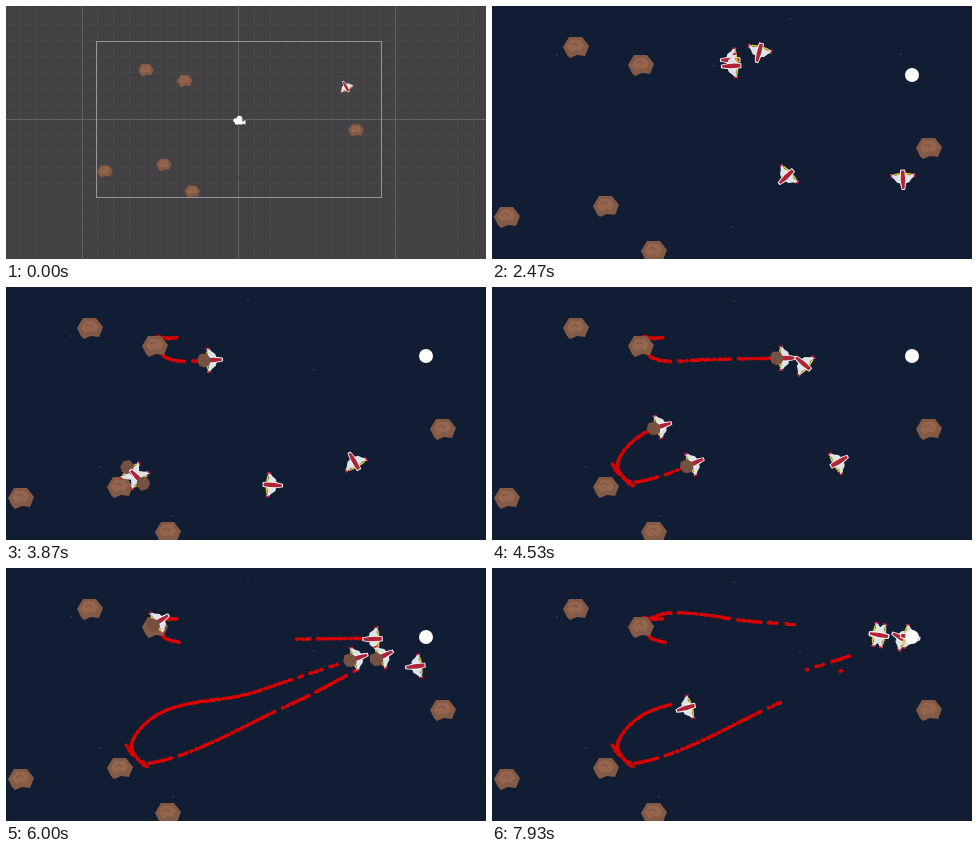
These frames come from a looping animation (480 by 253 pixels, 8000 ms). An HTML page with a canvas:

```html
<!DOCTYPE html>
<html lang="en">
<head>
<meta charset="utf-8">
<title>Asteroid foragers</title>
<style>
html, body { margin: 0; width: 100%; height: 100%; overflow: hidden; background: #111d33; }
canvas { display: block; width: 100vw; height: 100vh; }
</style>
</head>
<body>
<canvas id="stage"></canvas>
<script>
// Times are in seconds, angles in degrees.
const W = 480, H = 253, LOOP = 8, FPS = 15;
const PLAY = 0.4, LAUNCH = 1.2, SPEED = 130, ERASE_RADIUS = 14;
const BASE = { x: 420, y: 69 }, START_ANGLE = -119;
const canvas = document.getElementById('stage');
const ctx = canvas.getContext('2d');

const asteroids = [[84, 41], [149, 59], [437, 142], [114, 200], [15, 211], [162, 245]];
const earlyStars = [[65, 49], [298, 13], [409, 48], [222, 60], [240, 221]];
const lateStars = [[65, 49], [242, 14], [94, 180], [167, 229], [308, 83]];

function random(seed) {
  return () => {
    seed = (seed * 16807) % 2147483647;
    return seed / 2147483647;
  };
}

// Each pose is [time, x, y, angle]; curves between poses follow from the cruising speed.
// haul: pickup, end of trail, delivery. erase: when the ship clears trails it passes.
function makeShip({ poses, haul, erase }) {
  return { poses: [[LAUNCH, BASE.x, BASE.y, START_ANGLE], ...poses], haul, erase };
}

const ships = [
  makeShip({
    haul: [3.0, 5.12, 5.45], erase: [5.5, 6.35],
    poses: [
      [2.47, 238, 54, 180], [3.02, 167, 51, 175], [3.4, 152, 60, 75], [3.87, 207, 73, -2],
      [5.2, 380, 70, -1], [5.45, 412, 69, 0], [6.35, 302, 72, 180], [6.87, 284, 77, 222],
      [7.93, 387, 67, 8]
    ]
  }),
  makeShip({
    haul: [3.78, 5.78, 6.3], erase: [6.85, 8],
    poses: [
      [2.47, 239, 60, 178], [3.87, 127, 187, 48], [4.12, 150, 194, -12], [5.2, 285, 136, -24],
      [6.3, 414, 72, -20], [6.87, 333, 115, 176], [7.93, 194, 140, 163]
    ]
  }),
  makeShip({
    haul: [3.78, 6.05, 6.5],
    poses: [
      [2.47, 294, 171, 137], [3.87, 131, 190, 228], [4.19, 135, 160, -48], [5.2, 252, 123, -19],
      [6.5, 415, 70, -17], [6.87, 411, 64, 195], [7.4, 385, 92, 0], [7.93, 387, 67, 188]
    ]
  }),
  makeShip({
    poses: [
      [2.47, 267, 47, 102], [3.87, 267, 198, 2], [5.2, 415, 119, -45], [6.87, 391, 71, -57],
      [7.93, 409, 70, 210]
    ]
  }),
  makeShip({
    haul: [5.98, 7.14, 7.9], erase: [4.65, 5.6],
    poses: [
      [2.47, 411, 174, 88], [3.87, 348, 174, -119], [4.65, 298, 72, 180], [5.2, 229, 72, 181],
      [5.8, 155, 60, 180], [6.19, 178, 45, -3], [6.87, 266, 54, 4], [7.93, 418, 69, 10]
    ]
  })
];

const radians = degrees => degrees * Math.PI / 180;

function position(ship, t) {
  const p = ship.poses, last = p.length - 1;
  if (t <= p[0][0]) return { x: p[0][1], y: p[0][2] };
  t = Math.min(t, p[last][0]);
  const i = p.findIndex(pose => pose[0] >= t);
  const [t0, x0, y0, a0] = p[i - 1], [t1, x1, y1, a1] = p[i];
  const span = t1 - t0, u = (t - t0) / span, reach = SPEED * span;
  const mix = u * u * (3 - 2 * u);
  const leave = reach * u * (1 - u) ** 2, arrive = reach * u * u * (u - 1);
  return {
    x: x0 + (x1 - x0) * mix + Math.cos(radians(a0)) * leave + Math.cos(radians(a1)) * arrive,
    y: y0 + (y1 - y0) * mix + Math.sin(radians(a0)) * leave + Math.sin(radians(a1)) * arrive
  };
}

function heading(ship, t) {
  if (t <= LAUNCH) return radians(START_ANGLE);
  const end = Math.min(t, ship.poses.at(-1)[0]);
  const a = position(ship, end - 0.02), b = position(ship, end);
  return Math.atan2(b.y - a.y, b.x - a.x);
}

function eraseTime(dash) {
  for (const ship of ships.filter(s => s.erase)) {
    for (let t = ship.erase[0]; t < ship.erase[1]; t += 0.03) {
      const { x, y } = position(ship, t);
      if (t > dash.born && Math.hypot(x - dash.x, y - dash.y) < ERASE_RADIUS) return t;
    }
  }
  return Infinity;
}

function makeTrail(ship, index) {
  const rnd = random(index * 97 + 11), trail = [];
  const [start, end] = ship.haul;
  for (let t = start; t < end; t += 0.041) {
    const dash = { ...position(ship, t), angle: heading(ship, t) + (rnd() - 0.5) * 0.4, born: t + 0.08 };
    dash.length = 1 + rnd() * 3;
    dash.gone = eraseTime(dash);
    if (rnd() > 0.1) trail.push(dash);
  }
  return trail;
}

const dashes = ships.filter(s => s.haul).flatMap(makeTrail);

function polygon(color, points) {
  ctx.fillStyle = color;
  ctx.beginPath();
  points.forEach(([x, y]) => ctx.lineTo(x, y));
  ctx.closePath();
  ctx.fill();
}

function disc(color, x, y, r) {
  ctx.fillStyle = color;
  ctx.beginPath();
  ctx.arc(x, y, r, 0, Math.PI * 2);
  ctx.fill();
}

function line(color, width, x1, y1, x2, y2) {
  ctx.strokeStyle = color;
  ctx.lineWidth = width;
  ctx.beginPath();
  ctx.moveTo(x1, y1);
  ctx.lineTo(x2, y2);
  ctx.stroke();
}

function lens(color, back, front, half) {
  const mid = (back + front) / 2;
  ctx.fillStyle = color;
  ctx.beginPath();
  ctx.moveTo(back, -half * 0.7);
  ctx.quadraticCurveTo(mid, -half * 1.3, front, -half * 0.5);
  ctx.lineTo(front, half * 0.5);
  ctx.quadraticCurveTo(mid, half * 1.3, back, half * 0.7);
  ctx.closePath();
  ctx.fill();
}

function at(x, y, angle, draw) {
  ctx.save();
  ctx.translate(x, y);
  ctx.rotate(angle);
  draw();
  ctx.restore();
}

function drawAsteroid() {
  polygon('#825a45', [[-7, -10], [6, -10], [13, -1], [9, 9], [1, 8], [-6, 11], [-9, 8], [-13, 0]]);
  polygon('#95664d', [[-5, -7], [4, -7], [8, -2], [5, 4], [0, 3], [-5, 5], [-9, 0]]);
  line('#7d5542', 1.2, -5, -2, -1, -4);
  line('#7d5542', 1.2, -1, -4, 2, -1);
}

function drawRock() {
  polygon('#765040', [[-4, -6.5], [3, -6.5], [7, -1], [5, 5], [0, 7], [-5, 5], [-7, -1]]);
}

function drawShip() {
  for (const side of [-1, 1]) {
    polygon('#dde3e6', [[4, side * 2], [3, side * 6], [-1, side * 9], [-3, side * 12], [-6, side * 12], [-4, side * 7], [-6, side * 2]]);
    line('#dfc92c', 1.6, -6, side * 3, -5, side * 9);
    line('#c51f36', 1.6, -2, side * 11.5, -6, side * 12);
  }
  lens('#f6f6f6', -10, 10.5, 3.4);
  lens('#b02238', -9, 9.3, 2.4);
}

function drawStars(stars, color) {
  ctx.fillStyle = color;
  stars.forEach(([x, y]) => ctx.fillRect(x - 1, y - 1, 2, 2));
}

function drawEditor() {
  const step = 15.65;
  ctx.fillStyle = '#434144';
  ctx.fillRect(0, 0, W, H);
  const gridLines = (color, gap) => {
    for (let i = -15; i <= 15; i++) {
      const x = Math.floor(232.7 + i * gap) + 0.5, y = Math.floor(113.7 + i * gap) + 0.5;
      line(color, 1, x, 0, x, H);
      line(color, 1, 0, y, W, y);
    }
  };
  gridLines('#49474a', step);
  gridLines('#626163', step * 10);
  ctx.save();
  ctx.translate(90, 39.6);
  ctx.scale(0.595, 0.595);
  drawStars(earlyStars, '#29282b');
  asteroids.forEach(([x, y]) => at(x, y, 0, drawAsteroid));
  at(BASE.x, BASE.y, radians(START_ANGLE), drawShip);
  ctx.restore();
  ctx.strokeStyle = '#969597';
  ctx.lineWidth = 1;
  ctx.strokeRect(90.5, 35.5, 285, 156);
  // camera gizmo
  disc('#fff', 229.5, 114.5, 2.3);
  disc('#fff', 233.5, 112.5, 2.8);
  ctx.fillRect(229, 114, 7.5, 4.5);
  polygon('#fff', [[236, 116], [239.5, 114], [239.5, 118.5], [236, 117.5]]);
}

function drawGame(t) {
  ctx.fillStyle = '#111d33';
  ctx.fillRect(0, 0, W, H);
  drawStars(t < 2.9 ? earlyStars : lateStars, '#303036');
  ctx.lineCap = 'round';
  for (const d of dashes) {
    if (t < d.born || t >= d.gone) continue;
    at(d.x, d.y, d.angle, () => line('#d90000', 3.6, -d.length / 2, 0, d.length / 2, 0));
  }
  ctx.lineCap = 'butt';
  asteroids.forEach(([x, y]) => at(x, y, 0, drawAsteroid));
  for (const ship of ships) {
    const { x, y } = position(ship, t);
    const hauling = ship.haul && t >= ship.haul[0] && t < ship.haul[2];
    at(x, y, heading(ship, t), () => {
      drawShip();
      if (hauling) {
        ctx.translate(-8.5, 0);
        drawRock();
      }
    });
  }
  if (t > LAUNCH) disc('#fff', BASE.x, BASE.y, 7);
}

function render(seconds) {
  const ratio = window.devicePixelRatio || 1;
  const width = Math.round(innerWidth * ratio), height = Math.round(innerHeight * ratio);
  if (canvas.width !== width || canvas.height !== height) {
    canvas.width = width;
    canvas.height = height;
  }
  ctx.setTransform(width / W, 0, 0, height / H, 0, 0);
  const t = Math.floor((seconds % LOOP + 0.005) * FPS) / FPS % LOOP;
  if (t < PLAY) drawEditor();
  else drawGame(t);
}

const begin = performance.now();
function tick() {
  render((performance.now() - begin) / 1000);
  requestAnimationFrame(tick);
}
tick();
</script>
</body>
</html>
```
